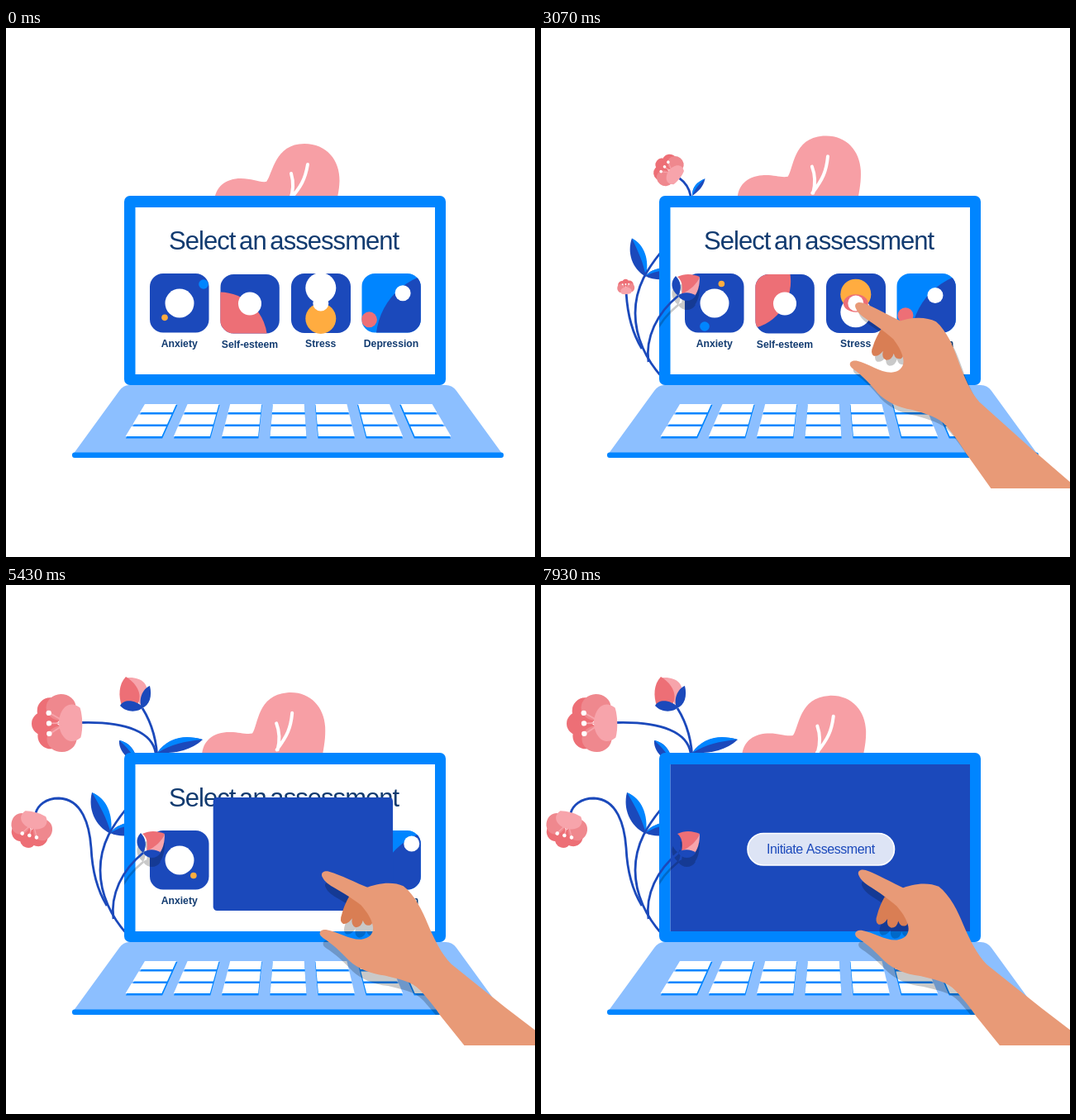
These frames come from a looping animation (640x640 px, 8000 ms). An HTML page with a canvas:

```html
<!DOCTYPE html>
<html lang="en">
<head>
<meta charset="utf-8">
<title>Select an assessment</title>
<style>
html, body { margin: 0; width: 100%; height: 100%; overflow: hidden; background: #fff; }
canvas { display: block; width: 100%; height: 100%; }
</style>
</head>
<body>
<canvas></canvas>
<script>
const LOOP = 8000, SIZE = 640, TAU = Math.PI * 2;
const WHITE = '#fff', NAVY = '#123b70', BLUE = '#1b49bb', BRIGHT = '#0085ff', SKY = '#8cbfff',
  BLUSH = '#f79fa5', LIGHT = '#f7a4ab', ROSE = '#ef888e', RED = '#ed6f76', ORANGE = '#ffac40',
  SKIN = '#e89a77', KNUCKLE = '#d97e54', SHADE = 'rgba(0,0,0,.21)';

const canvas = document.querySelector('canvas');
const ctx = canvas.getContext('2d');
const ratio = window.devicePixelRatio || 1;
canvas.width = canvas.height = SIZE * ratio;

// ---------- helpers ----------
const rad = deg => deg * Math.PI / 180;
const lerp = (a, b, k) => a + (b - a) * k;
const clamp = k => Math.min(1, Math.max(0, k));
const ease = (t, from, to) => (1 - Math.cos(Math.PI * clamp((t - from) / (to - from)))) / 2;

// Smooth monotone interpolation through rows of [time, value, ...].
function track(rows, t, col = 1) {
  const last = rows.length - 1;
  if (t <= rows[0][0]) return rows[0][col];
  if (t >= rows[last][0]) return rows[last][col];
  const i = rows.findIndex(r => r[0] > t) - 1;
  const slope = k => k < 0 || k >= last ? 0 : (rows[k + 1][col] - rows[k][col]) / (rows[k + 1][0] - rows[k][0]);
  const tangent = k => { const a = slope(k - 1), b = slope(k); return a * b > 0 ? 2 * a * b / (a + b) : 0; };
  const span = rows[i + 1][0] - rows[i][0], u = (t - rows[i][0]) / span, v = 1 - u;
  return rows[i][col] * (1 + 2 * u) * v * v + rows[i + 1][col] * (3 - 2 * u) * u * u
    + span * u * v * (tangent(i) * v - tangent(i + 1) * u);
}

function fill(shape, color) {
  ctx.fillStyle = color;
  ctx.fill(typeof shape === 'string' ? new Path2D(shape) : shape);
}
function stroke(d, color, width) {
  ctx.strokeStyle = color;
  ctx.lineWidth = width;
  ctx.lineCap = 'round';
  ctx.stroke(new Path2D(d));
}
function ellipse(x, y, rx, ry = rx) {
  const p = new Path2D();
  p.ellipse(x, y, rx, ry, 0, 0, TAU);
  return p;
}
function box(x, y, w, h, r) {
  const p = new Path2D();
  p.roundRect(x, y, w, h, r);
  return p;
}
const circle = (x, y, r, color) => fill(ellipse(x, y, r), color);

function layer(draw) {
  ctx.save();
  draw();
  ctx.restore();
}
function around(x, y, angle, scale, draw) {
  layer(() => {
    ctx.translate(x, y);
    ctx.rotate(rad(angle));
    ctx.scale(scale, scale);
    ctx.translate(-x, -y);
    draw();
  });
}
function text(str, x, y, font, color, { spacing = 0, gap = 0, align = 'left' } = {}) {
  ctx.font = font + ' "Liberation Sans", Arial, sans-serif';
  ctx.letterSpacing = spacing + 'px';
  ctx.wordSpacing = gap + 'px';
  ctx.textAlign = align;
  ctx.fillStyle = color;
  ctx.fillText(str, x, y);
}

// ---------- laptop ----------
const lid = box(143, 203, 389, 229, 7);
const deck = new Path2D('M81 516L137 439Q142 432 149 432H532Q540 432 545 439L601 516Z');
const front = box(80, 513.5, 522, 6.5, 3);
const laptop = new Path2D();
[lid, deck, front].forEach(p => laptop.addPath(p));

function keyPatch(col, top, bottom, color, shift = 0) {
  const edge = (y, side) => {
    const k = (y - 455) / 40;
    return shift + lerp(168 + 51.6 * col + 38 * side, 144 + 58.5 * col + 44 * side, k);
  };
  fill(`M${edge(top, 0)} ${top}L${edge(top, 1)} ${top}L${edge(bottom, 1)} ${bottom}L${edge(bottom, 0)} ${bottom}Z`, color);
}
function drawLaptop() {
  fill(lid, BRIGHT);
  fill(box(156.5, 217, 362.5, 202, 0), WHITE);
  fill(deck, SKY);
  fill(front, BRIGHT);
  for (let col = 0; col < 7; col++) {
    keyPatch(col, 456, 496.5, BRIGHT, (3 - col) * 0.6);
    [[455, 465], [467.5, 479.5], [482, 494]].forEach(([a, b]) => keyPatch(col, a, b, WHITE));
  }
}

// ---------- plants ----------
function stem(d) {
  const holder = document.createElement('div');
  holder.innerHTML = `<svg><path d="${d}"/></svg>`;
  const path = holder.querySelector('path');
  return { path, shape: new Path2D(d), length: path.getTotalLength() };
}
const tallStem = stem('M146 422C128 402 114 375 114 345C114 312 130 290 146 270C165 245 180 230 181 203C177 179 148 165 91 166.5');
const lowStem = stem('M122 388C108 365 104 340 103 318C101 290 92 259 64 258C48 258 38 267 36 276');
const topStem = stem('M183 215C183 185 175 165 165 149');
const frontStem = stem('M130 404C126 375 140 345 166 324');

function growStem({ path, shape, length }, k, color = BLUE) {
  if (k <= 0) return { x: 0, y: 0, angle: 0 };
  const reach = length * k;
  layer(() => {
    ctx.setLineDash([reach, length * 2]);
    ctx.strokeStyle = color;
    ctx.lineWidth = 2.8;
    ctx.stroke(shape);
  });
  const tip = path.getPointAtLength(reach), before = path.getPointAtLength(Math.max(0, reach - 2));
  return { x: tip.x, y: tip.y, angle: Math.atan2(tip.y - before.y, tip.x - before.x) };
}
function flower({ x, y, angle }, scale) {
  if (scale <= 0) return;
  layer(() => {
    ctx.translate(x, y);
    ctx.rotate(angle);
    ctx.scale(scale, scale);
    circle(46, 0, 14, RED);
    for (const s of [-1, 1]) circle(37, 15 * s, 16, RED);
    for (const s of [-1, 1]) fill(ellipse(24, 19 * s, 18, 16), ROSE);
    fill('M1 -18C16 -30 27 -14 27 0C27 14 16 30 1 18C-2 8 -2 -8 1 -18Z', LIGHT);
    for (const s of [-1, 0, 1]) {
      stroke(`M24 ${4 * s}L38 ${12.5 * s}`, LIGHT, 1.8);
      circle(39, 12.5 * s, 3.2, WHITE);
    }
  });
}
const topBud = [
  ['M147 112C165 111 173 121 170 132L162 145Z', LIGHT],
  ['M145 111C136 120 136 135 140 146L158 146C166 135 160 120 145 111Z', RED],
  ['M138 146C142 138 156 138 166 148C160 154 146 155 138 146Z', BLUE],
  ['M164 149C160 138 165 126 174 122C177 134 174 146 164 149Z', BLUE]];
const frontBud = [
  ['M165 302C175 297 185 299 192 302C189 311 181 319 170 324C172 312 170 306 165 302Z', RED],
  ['M192 302C192 312 190 322 184 327L170 323C181 318 189 310 192 302Z', LIGHT],
  ['M163 301C156 308 157 318 166 325C171 316 169 307 163 301Z', BLUE],
  ['M166 325C170 320 182 320 187 325C182 333 171 333 166 325Z', BLUE]];

function bud(parts, home, tip, scale, color) {
  if (scale <= 0) return;
  layer(() => {
    ctx.translate(tip.x, tip.y);
    ctx.scale(scale, scale);
    ctx.translate(-home[0], -home[1]);
    if (color) {
      const whole = new Path2D();
      parts.forEach(([d]) => whole.addPath(new Path2D(d)));
      fill(whole, color);
    } else parts.forEach(([d, c]) => fill(d, c));
  });
}

const treeSway = [[0, 0], [1290, -1.1], [3070, -4.3], [4450, -5], [5930, -4.1], [7930, -2.7], [9500, -1.5]];
function drawTree(t) {
  around(225, 400, track(treeSway, t), 1, () => {
    fill('M252 212C252 192 266 182 284 182C298 182 306 187 315 186C323 176 325 140 361 140C388 140 404 160 403.5 185C403 198 401 206 396 225L255 235Z', BLUSH);
    stroke('M345 176C348 186 348 196 344 208M365 165C362 183 357 192 343 208', WHITE, 4);
  });
}

const tallGrowth = [[450, 0], [1290, 0.25], [3070, 0.775], [4070, 0.97], [4600, 1]];
const tallBloom = [[900, 0], [1290, 0.12], [3070, 0.57], [4070, 0.85], [4700, 1]];
const lowGrowth = [[1600, 0], [3070, 0.37], [4070, 0.8], [4700, 1]];
const lowBloom = [[1700, 0], [3070, 0.3], [4070, 0.56], [4700, 0.72]];
const leafTurn = [[2700, -68], [3070, -37], [4000, 9], [4800, 0]];

function drawBackPlants(t) {
  const open = track([[1800, 0], [3070, 0.9], [3700, 1]], t);
  around(127, 301, 45 * (1 - open), open, () => {
    fill('M104 251C99 270 107 292 127 301C128 280 120 258 104 251Z', BLUE);
    fill('M104 251C122 258 130 278 127 301C122 282 114 268 104 251Z', BRIGHT);
    fill('M126 300C134 290 142 289 152 288L150 303C140 304 132 303 126 300Z', BLUE);
    fill('M126 300C134 290 142 289 152 286L150 291C142 292 134 295 126 300Z', BRIGHT);
  });
  around(183, 203, track(leafTurn, t), track([[2700, 0], [3070, 0.45], [3900, 1]], t), () => {
    fill('M183 203C195 186 215 181 238 187C222 202 200 204 183 203Z', BLUE);
    fill('M183 203C195 185 215 180 238 187C215 189 200 193 183 203Z', BRIGHT);
  });
  around(158, 216, 0, ease(t, 3200, 4000), () => {
    fill('M137 188C136 200 146 210 158 216C159 202 149 190 137 188Z', BLUE);
    fill('M137 188C149 190 159 202 158 216C153 203 146 196 137 188Z', BRIGHT);
  });
  const topTip = growStem(topStem, ease(t, 3000, 3800));
  bud(topBud, [165, 149], topTip, ease(t, 3050, 3950));
  flower(growStem(lowStem, track(lowGrowth, t)), track(lowBloom, t));
  flower(growStem(tallStem, track(tallGrowth, t)), track(tallBloom, t));
}
function drawFrontPlant(t) {
  const growth = ease(t, 1500, 2600), scale = ease(t, 1900, 2800), home = [166, 325];
  layer(() => {
    ctx.clip(laptop);
    ctx.translate(0, 11);
    bud(frontBud, home, growStem(frontStem, growth, SHADE), scale, SHADE);
  });
  bud(frontBud, home, growStem(frontStem, growth), scale);
}

// ---------- screen ----------
function tile(x, y, color, draw) {
  layer(() => {
    ctx.clip(box(x, y, 71.5, 71.5, 16));
    ctx.fillStyle = color;
    ctx.fillRect(x, y, 72, 72);
    draw();
  });
}
const polar = (x, y, r, deg) => [x + r * Math.cos(rad(deg)), y + r * Math.sin(rad(deg))];

const moonPath = [[0, 29, -23], [1290, 18, 3], [3070, -12, 28], [4070, -22, 18], [4860, -9, 4]];
function anxiety(t) {
  const moon = () => circle(210 + track(moonPath, t, 1), 333 + track(moonPath, t, 2), 5.8, BRIGHT);
  const planet = () => circle(210, 333, 17.5, WHITE);
  (t < 4100 ? [planet, moon] : [moon, planet]).forEach(draw => draw());
  circle(...polar(210, 333, 25, 136 + 0.05 * t), 3.8, ORANGE);
}
function selfEsteem(t) {
  circle(...polar(295, 333.5, 58, 130 + 0.0253 * t), 58.5, RED);
  circle(295, 333.5, 14, WHITE);
}
function stress(t) {
  const r = 18.5, swing = r * Math.cos(TAU * t / 4720), x = 380.8, y = 333;
  circle(x, y - swing, r, WHITE);
  circle(x, y + swing, r, ORANGE);
  fill(ellipse(x, y, Math.sqrt(r * r - swing * swing), r - Math.abs(swing) + 3), RED);
  circle(x, y, 9.5, WHITE);
}
function depression(t) {
  circle(530, 378, 82.5, BLUE);
  const period = 2930, step = 67.7, turn = step * (t % period) / period;
  for (const k of [-1, 0, 1]) {
    circle(...polar(530, 378, 94, 195.5 + turn + k * step), 9.5, RED);
    circle(...polar(530, 378, 76, 229 - turn + k * step), 9.5, WHITE);
  }
}

function drawScreen(t) {
  const label = (str, x, y) => text(str, x, y, 'bold 12.2px', NAVY, { align: 'center' });
  const open = ease(t, 4463, 6398);
  text('Select an assessment', 197, 268, '31px', NAVY, { spacing: -0.95, gap: -3 });
  tile(174, 297, BLUE, () => anxiety(t));
  tile(259.3, 298, BLUE, () => selfEsteem(t));
  tile(430.3, 297, BRIGHT, () => depression(t));
  label('Anxiety', 209.7, 386);
  label('Self-esteem', 295, 387);
  label('Depression', 466, 386);

  const left = lerp(345, 156.5, open), top = lerp(297, 217, open);
  const right = lerp(417, 519, open), bottom = lerp(369, 419, open);
  fill(box(left, top, right - left, bottom - top, lerp(16, 0, Math.sqrt(open))), BLUE);
  layer(() => {
    ctx.globalAlpha = clamp(1 - open * 4);
    stress(t);
    label('Stress', 380.7, 386);
  });

  layer(() => {
    ctx.globalAlpha = ease(t, 6500, 7100);
    const button = box(250, 300.5, 177.5, 38.5, 19.2);
    fill(button, '#dde4f5');
    ctx.strokeStyle = WHITE;
    ctx.lineWidth = 1.6;
    ctx.stroke(button);
    text('Initiate Assessment', 273, 325.3, '16px', BLUE, { spacing: -0.42 });
  });
}

// ---------- hand ----------
const palm = new Path2D('M430 356C448 349 466 349 478 355C491 366 500 387 505 402C512 421 520 440 531 452L594 508L640 547L720 618L595 622L546 557L515 514C508 502 500 492 492 482C482 470 466 467 450 462C432 459 418 452 408 442C398 430 388 420 378 413C371 408 374 402 382 403C396 406 410 417 424 417C436 416 441 408 438 398C436 390 432 384 426 376L420 366Z');
const finger = new Path2D('M381 340C378 335 382 331 389 333C404 338 418 347 440 357L437 386C425 374 410 363 396 354C388 349 383 345 381 340Z');
const curled = new Path2D('M412 364L428 370C440 385 442 396 436 400Q429 402 427 394Q425 402 418 402Q412 400 414 391Q409 398 403 397Q398 394 402 385Q405 375 412 364Z');

// time, x, y, arm angle, index finger angle, shadow drop
const reach = [
  [250, 25, 215, -5, -14, 11], [860, 25, 128, -5, -14, 11], [1290, 25, 85, -5, -14, 11], [1710, 20, 60, -4, -10, 11],
  [2500, 0, 0, 0.5, 0, 7], [4070, 0, 0, 0, 0, 7], [4400, 0, 0, 0, 0, 7], [4860, 0, 4, -1.5, 0, 9],
  [5600, 3, 11, -3, 0, 13], [5930, 3, 11, -3, 0, 13], [7930, 3, 11, -3, 3, 13]];

function drawHand(t) {
  const [x, y, angle, bend, drop] = [1, 2, 3, 4, 5].map(col => track(reach, t, col));
  const arm = new DOMMatrix().translate(x + 455, y + 351).rotate(angle).translate(-455, -351);
  const index = arm.multiply(new DOMMatrix().translate(437, 366).rotate(bend).translate(-437, -366));
  const placed = (shape, matrix) => {
    const p = new Path2D();
    p.addPath(shape, matrix);
    return p;
  };
  const hand = placed(palm, arm);
  hand.addPath(finger, index);
  const fingers = placed(curled, arm);
  const whole = new Path2D(hand);
  whole.addPath(fingers);
  layer(() => {
    ctx.clip(laptop);
    ctx.translate(4, drop);
    fill(whole, SHADE);
  });
  layer(() => {
    ctx.clip(box(0, 0, SIZE, 557, 0));
    fill(fingers, KNUCKLE);
    fill(hand, SKIN);
  });
}

function frame(now) {
  const t = now % LOOP;
  ctx.setTransform(ratio, 0, 0, ratio, 0, 0);
  ctx.fillStyle = WHITE;
  ctx.fillRect(0, 0, SIZE, SIZE);
  drawTree(t);
  drawBackPlants(t);
  drawLaptop();
  drawScreen(t);
  drawFrontPlant(t);
  drawHand(t);
  requestAnimationFrame(() => frame(performance.now() - start));
}
const start = performance.now();
frame(0);
</script>
</body>
</html>
```
